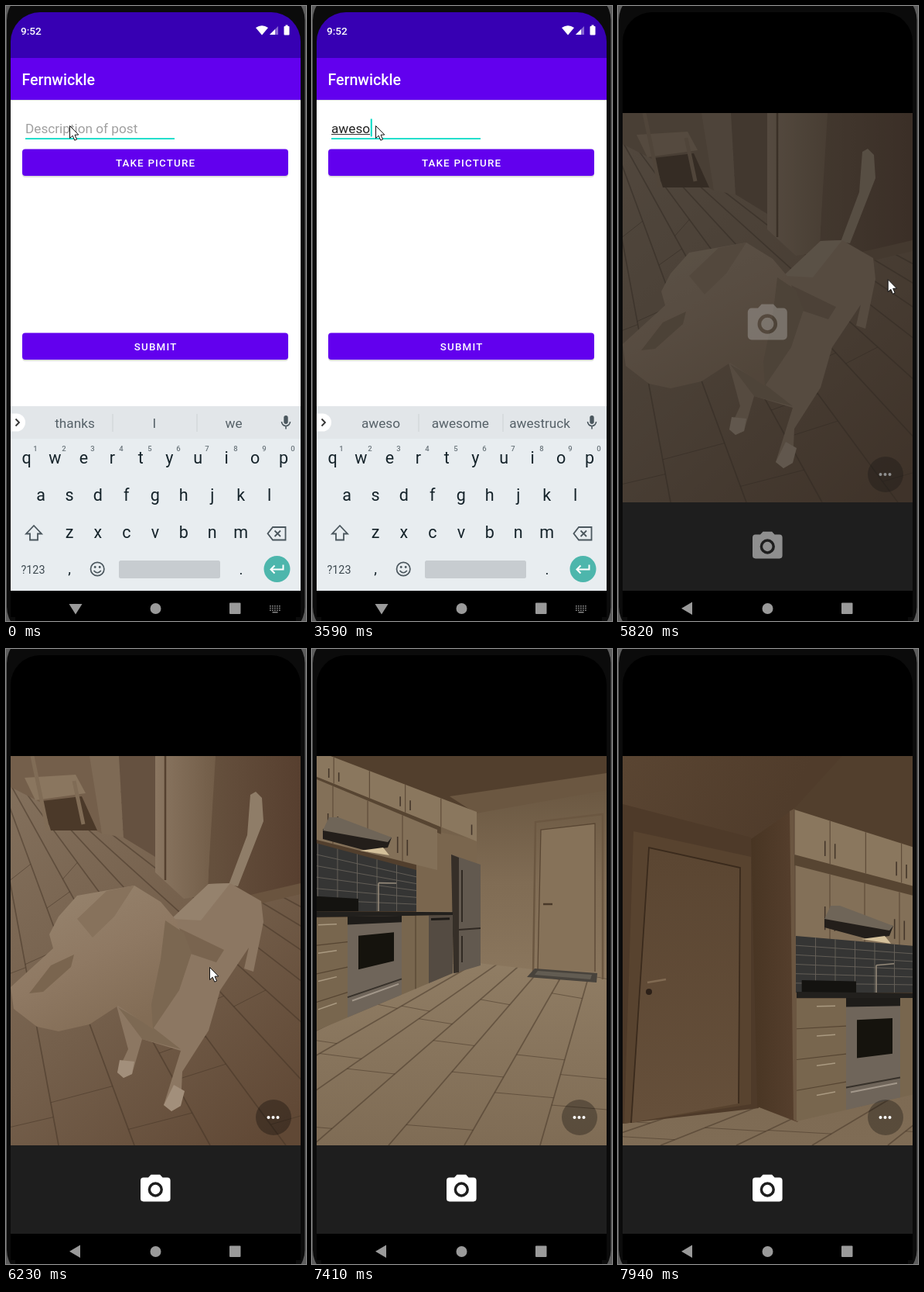
An HTML page with a canvas for the animation above (8 s loop, 388 by 793 pixels).

```html
<!DOCTYPE html>
<html lang="en">
<head>
<meta charset="utf-8">
<title>Photo post</title>
<style>
html, body { margin: 0; width: 100%; height: 100%; overflow: hidden; background: #000; }
canvas { display: block; }
</style>
</head>
<body>
<canvas id="stage" width="388" height="793"></canvas>
<script>
const c = document.getElementById('stage').getContext('2d');
const LOOP = 8000;
const PURPLE = '#6200ee', TEAL = '#03dac5', GREY = '#9a9a9a';

// ---------- helpers ----------
const mix = (a, b, k) => a + (b - a) * k;
const span = (t, a, b) => Math.max(0, Math.min(1, (t - a) / (b - a)));
const smooth = v => v * v * (3 - 2 * v);
const noise = n => Math.abs(Math.sin(n * 127.1) * 43758.5) % 1;

function rect(color, x, y, w, h, r = 0) {
  c.fillStyle = color;
  c.beginPath();
  c.roundRect(x, y, w, h, r);
  c.fill();
}
function disc(color, x, y, r) {
  c.fillStyle = color;
  c.beginPath();
  c.arc(x, y, r, 0, 7);
  c.fill();
}
function poly(color, points) {
  c.fillStyle = color;
  c.fill(new Path2D('M' + points + 'Z'));
}
function stroke(color, width, path) {
  c.strokeStyle = color;
  c.lineWidth = width;
  c.stroke(new Path2D(path));
}
function text(s, x, y, size, color, { weight = 400, align = 'center', spacing = 0 } = {}) {
  c.font = `${weight} ${size}px Roboto, sans-serif`;
  c.letterSpacing = spacing + 'px';
  c.textAlign = align;
  c.fillStyle = color;
  c.fillText(s, x, y);
  return c.measureText(s).width;
}
function gradient(x0, y0, x1, y1, ...colors) {
  const g = c.createLinearGradient(x0, y0, x1, y1);
  colors.forEach((col, i) => g.addColorStop(i / (colors.length - 1), col));
  return g;
}
function layer(draw, { x = 0, y = 0, alpha = 1, clip } = {}) {
  c.save();
  c.globalAlpha *= alpha;
  if (clip) { c.beginPath(); c.roundRect(...clip); c.clip(); }
  c.translate(x, y);
  draw();
  c.restore();
}

// ---------- post form ----------
const WORD = 'awesome';
const presses = [210, 440, 720, 870, 2070, 2220, 2340, 3590, 4090, 4210];
const deletions = [2830, 3010, 3190];
const caretOff = [[0, 210], [1390, 1850], [4710, 5220]];
// The two guesses beside the typed prefix, by its length.
const guesses = ['I we', 'I and', 'away awesome', 'awesome awful', 'awesome awestruck',
  'awesome awestruck', 'awesome awesomely', 'awesomeness awesomely'];

function button(label, y, ripple = 0) {
  rect('rgba(0,0,0,.13)', 21, y + 1, 344, 35.5, 4);
  rect(PURPLE, 21, y, 344, 34.5, 4);
  if (ripple) layer(() => disc('rgba(255,255,255,.17)', 151, y + 18, ripple), { clip: [21, y, 344, 34.5, 4] });
  text(label, 193.6, y + 22.6, 13.36, '#fff', { weight: 500, spacing: 1.19 });
}

function form(t) {
  const past = times => times.filter(at => t >= at).length;
  const length = past(presses) - past(deletions);
  const typed = WORD.slice(0, length);

  rect('#fff', 6, 121, 375, 395);
  rect('#3700b3', 6, 8, 375, 59);
  rect(PURPLE, 6, 67, 375, 54);
  rect('rgba(0,0,0,.12)', 6, 121, 375, 1);
  text('9:52', 19, 36.5, 13.6, '#fff', { weight: 500, align: 'left' });
  poly('#fff', '323,28Q331,22.5 339,28L331,37.5');
  poly('rgba(255,255,255,.4)', '341,37 352,37 352,26');
  poly('#fff', '341,37 348,37 348,30');
  rect('#fff', 359.5, 26, 7, 11.5, 1);
  rect('#fff', 361.5, 24.5, 3, 2);
  text('Fernwickle', 20.5, 102, 19.6, '#fff', { weight: 500, align: 'left' });

  if (typed) {
    const w = text(typed, 25, 164, 17.2, '#222', { align: 'left' });
    rect('#333', 25, 165, w, 1);
    if (!caretOff.some(([a, b]) => t >= a && t < b)) rect(TEAL, 25 + w + .7, 145.5, 2, 23);
  } else {
    text('Description of post', 25, 164, 17.2, '#a0a0a0', { align: 'left' });
  }
  rect(TEAL, 25, 170.2, 193, 1.9);
  button('TAKE PICTURE', 184.5, t >= 5220 ? 117 + (t - 5220) * .8 : 0);
  button('SUBMIT', 421.5);
  keyboard([typed || 'thanks', ...guesses[length].split(' ')]);
}

function hint(word, x, room) {
  c.font = '400 17.2px Roboto, sans-serif';
  const size = 17.2 * Math.min(1, room / c.measureText(word).width);
  text(word, x, 543.5, size, '#566168');
}

function keyRow(letters, x, y) {
  [...letters].forEach((ch, i) => text(ch, x + 36.95 * i, y, 21.5, '#15232a'));
}

function keyboard(hints) {
  const ink = '#4b575e';
  rect('#e8edf0', 6, 516, 375, 238);
  rect('#e2e6e9', 6, 516, 375, 42);
  hints.forEach((word, i) => hint(word, 89 + 102.8 * i, i < 2 ? 95 : 83));
  rect('#cbd1d4', 137.5, 526, 1, 23);
  rect('#cbd1d4', 246.5, 526, 1, 23);
  rect('#fff', 6, 525.5, 19, 23, [0, 11.5, 11.5, 0]);
  stroke('#333', 1.8, 'M12.5,532.5 l4.5,4.5 l-4.5,4.5');
  rect(ink, 359.3, 528, 5.4, 11, 2.7);
  stroke(ink, 1.6, 'M356.5,536 a5.5,5.5 0 0 0 11,0 M362,541.5 v4');

  keyRow('qwertyuiop', 26.5, 589.5);
  [...'1234567890'].forEach((d, i) => text(d, 38 + 37 * i, 574, 9.5, '#6b767c', { weight: 500 }));
  keyRow('asdfghjkl', 45, 637.5);
  keyRow('zxcvbnm', 82, 685.5);
  stroke(ink, 1.8, 'M36,670 L26,680.5 H31 V688.5 H41 V680.5 H46 Z');
  stroke(ink, 1.8, 'M345,672 H361.5 V688.5 H345 L338.5,680.2 Z M347.5,676.5 l7.5,7.5 m0,-7.5 l-7.5,7.5');

  text('?123', 35, 731.5, 14.3, '#3c484f');
  text(',', 82, 732, 19, '#15232a');
  text('.', 304, 733, 19, '#15232a');
  stroke(ink, 1.7, 'M109.5,726 a8.7,8.7 0 1 0 17.4,0 a8.7,8.7 0 1 0 -17.4,0 M113.5,728 q4.7,5.5 9.4,0');
  disc(ink, 115.2, 723.5, 1.4);
  disc(ink, 121.2, 723.5, 1.4);
  rect('#c7ccd0', 146, 715, 131, 23, 2.5);
  disc('#4db6ac', 350.5, 726, 17);
  stroke('#fff', 2, 'M358.5,720.5 V726.5 H343 M347.5,721.5 l-5,5 l5,5');
}

function navBar(withKeyboard) {
  rect('#000', 6, 754, 375, 34);
  poly(GREY, withKeyboard ? '81.5,771 98.5,771 90,784.5' : '96,768.5 96,785 82,776.7');
  disc(GREY, 193.5, 777, 7);
  rect(GREY, 289, 769.5, 14.5, 14.5, 1);
  if (withKeyboard) {
    for (let i = 0; i < 15; i++) rect('#888', 341 + i % 5 * 3, 773 + (i / 5 | 0) * 2.7, 1.7, 1.6);
    rect('#888', 344.5, 781, 7, 1.5);
  }
}

// ---------- camera views ----------
// Planks run from a vanishing point to the bottom edge, with scattered cross joints.
function floor(fill, vx, vy, slant) {
  rect(fill, 6, 138, 375, 502);
  const seam = 'rgba(66,50,36,.5)';
  for (let i = -14; i < 14; i++) {
    const x = vx + 98 * i;
    const at = (px, s) => `${mix(vx, px, s)},${mix(vy, 640, s)}`;
    stroke(seam, 1.7, `M${vx},${vy} L${x},640`);
    for (let j = 0; j < 3; j++) {
      const s = .3 + (j + noise(i * 3 + j)) * .24;
      stroke(seam, 1, `M${at(x, s)} L${at(x + 98, s + slant)}`);
    }
  }
}

function dogView() {
  floor(gradient(6, 200, 381, 600, '#826f5b', '#745f4b', '#604835'), -30, 110, -.04);
  // back room and chair
  poly('#745f4b', '6,138 110,138 124,238 6,178');
  poly('#4b3929', '46,196 98,190 118,234 58,234');
  poly('#8a765f', '24,166 90,162 103,186 38,195');
  stroke('#806c56', 5, 'M34,138 L54,234 M88,170 L100,226');
  poly('#7e6a55', '108,138 146,138 152,243 124,238');
  poly('#655140', '146,138 193,138 193,268 152,243');
  // door post and wall
  poly(gradient(268, 0, 381, 0, '#65503d', '#573f2f'), '268,138 381,138 381,312 260,336');
  poly('#6a543f', '260,330 381,302 381,316 260,345');
  poly(gradient(193, 0, 270, 0, '#8a7661', '#725d48'), '193,138 271,138 260,318 230,322 193,288');
  stroke('#55412f', 2.5, 'M206,138 V298');
  // dog, back to front
  poly('#8f7d68', '316,188 323,184 331,192 333,222 300,306 288,304 312,240');
  poly('#8c7762', '214,348 262,303 290,302 330,325 333,352 320,416 308,412 314,385 277,440 262,492 228,545 226,589 214,596 204,588 226,518 176,503 163,548 152,553 144,546 158,516 143,460');
  poly('#95826d', '214,348 262,303 290,302 252,350');
  poly('#79644f', '224,360 282,388 272,404 236,392');
  poly('#7d6953', '145,462 190,488 226,516 176,503');
  poly('#a28f7b', '217,562 231,570 226,589 214,596 204,588');
  poly('#a28f7b', '147,530 166,532 163,548 152,553 144,546');
  poly(gradient(60, 310, 150, 490, '#96836d', '#8f7963', '#826c55'), '6,436 61,386 56,368 68,345 92,318 166,305 200,326 222,352 212,440 190,490 145,460 108,484 68,493 40,487 10,464');
  poly('#87725c', '92,348 130,312 166,305 140,345 112,372');
  poly('#7a654f', '30,444 58,408 88,394 84,410 48,442');
  poly('#7b6751', '206,350 230,366 240,392 224,440 190,490 188,458 200,400');
}

// A wall face [x, top, bottom, x, top, bottom] blended between two viewpoints.
function face(from, to, k) {
  const [x0, t0, b0, x1, t1, b1] = from.map((v, i) => mix(v, to[i], k));
  return (u, v) => `${mix(x0, x1, u)},${mix(mix(t0, t1, u), mix(b0, b1, u), v)}`;
}
function panel(at, color, u0 = 0, v0 = 0, u1 = 1, v1 = 1) {
  poly(color, [at(u0, v0), at(u1, v0), at(u1, v1), at(u0, v1)].join(' '));
}
function bar(at, color, width, u0, v0, u1, v1) {
  stroke(color, width, `M${at(u0, v0)} L${at(u1, v1)}`);
}

function cupboards(at, color, doors) {
  panel(at, color);
  for (let i = 0; i < doors; i++) {
    const handle = (i + (i % 2 ? .14 : .86)) / doors;
    bar(at, '#5f4c39', 1.2, i / doors, 0, i / doors, 1);
    bar(at, '#44362a', 1.6, handle, .5, handle, .85);
  }
}

function cooker(at) {
  panel(at, '#6f655a', .32, 0, .67, 1);
  panel(at, '#1e1c19', .32, 0, .67, .08);
  panel(at, '#15130d', .39, .2, .62, .55);
  bar(at, '#37312a', 2, .32, .8, .67, .8);
  bar(at, '#a2978a', 2, .35, .85, .65, .85);
}

function kitchen(k) {
  const upper = face([-18, 122, 155, 213, 210, 248], [228, 207, 265, 459, 280, 326], k);
  const lower = face([-18, 158, 240, 162, 233, 285], [229, 279, 371, 409, 325, 390], k);
  const splash = face([-18, 244, 338, 135, 285, 338], [230, 370, 443, 383, 383, 443], k);
  const base = face([-18, 346, 502, 182, 343, 418], [231, 450, 609, 431, 450, 563], k);

  panel(upper, '#574532', 0, 1, .8, 1.25);
  cupboards(upper, '#8a775e', 5);
  cupboards(lower, '#837058', 4);
  panel(splash, '#353534');
  for (let row = 1; row < 6; row++) {
    bar(splash, '#68635b', .9, 0, row / 6, 1, row / 6);
    bar(splash, '#68635b', .9, row / 6, 0, row / 6, 1);
  }
  panel(splash, '#141310', .05, .78, .51, 1);
  bar(splash, '#958a7a', 1.6, .68, 1, .68, .45);
  bar(splash, '#958a7a', 1.6, .68, .45, .83, .4);
  // extractor hood
  layer(() => {
    poly('#231e1a', '14,232 103,243 98,256 70,260 14,245');
    poly('#6f6558', '22,217 34,217 103,243 98,249 14,234');
    poly('#d4c09a', '62,260 92,256 100,266');
  }, { x: 253 * k, y: 114 * k });

  panel(base, '#78664e');
  for (let i = 0; i < 4; i++) {
    bar(base, '#564532', 1.2, 0, i / 4, .32, i / 4);
    bar(base, '#aa9a81', 1.5, .13, i / 4 + .07, .25, i / 4 + .07);
  }
  cooker(base);
  bar(base, '#564532', 1.2, .76, 0, .76, 1);
  panel(base, '#544b42', .845, 0, 1, 1);
  bar(base, '#1d1a17', 3, .86, .06, .98, .06);
  panel(base, '#22201d', 0, -.05, 1, 0);
}

function farWall() {
  poly(gradient(0, 180, 0, 420, '#6b5842', '#806c54', '#8a765d'), '135,230 205,210 381,180 700,126 700,470 381,424 215,405 135,405');
  poly('#6b5741', '178,190 381,160 381,182 212,212');
  poly('#7a664e', '135,230 213,246 213,338 135,338');
  poly('#62594f', '180,265 218,278 218,408 184,418');
  poly('#362f28', '180,265 190,269 190,417 183,418');
  stroke('#302923', 2, 'M190,362 L218,360 M194,285 V352 M194,370 V404');
  stroke('#6b5741', 2.5, 'M286,420 L289,223 L376,213 V426');
  poly('#867259', '296,233 366,225 366,416 292,413');
  stroke('#594633', 1.3, 'M292,413 L296,233 L366,225 V416');
  stroke('#493929', 2.4, 'M299,329 h12');
  poly('#48433c', '288,412 369,418 368,430 278,423');
  poly('#625c52', '292,415 362,420 360,426 288,420');
}

function nearDoor() {
  poly(gradient(6, 138, 200, 240, '#5a4532', '#503c2b'), '6,138 290,138 228,206 172,245 6,205');
  poly('#4e3a29', '6,200 172,243 182,592 6,612');
  poly('#58432f', '20,235 172,268 172,587 8,612');
  poly(gradient(0, 260, 0, 600, '#5b4632', '#654f3a'), '40,256 158,282 156,586 17,611');
  stroke('#3a2a1c', 1.8, 'M17,611 L40,256 L158,282 L156,586');
  stroke('#806a52', 2.4, 'M38,430 L62,426');
  disc('#2c2018', 40, 442, 4);
  poly(gradient(172, 0, 230, 0, '#483523', '#563f2d'), '172,245 228,206 232,610 180,590');
  poly('#6b5641', '222,209 228,206 233,610 227,607');
}

function room(k) {
  const x = 250 * k, y = 107 * k;
  floor(gradient(0, 400 + y, 0, 640, k > .5 ? '#7c6952' : '#907d64', '#7f6c55'), 393 + x, 300 + y, .02);
  rect('#523f2d', 6, 138, 375, 250 + y);
  layer(farWall, { x, y });
  layer(nearDoor, { x: x - 250, y: y - 107 });
  kitchen(k);
}

function preview(t) {
  const turn = span(t, 6600, 7410), x = 375 * mix(turn, smooth(turn), .4);
  if (turn < 1) layer(dogView, { x });
  if (turn > 0) layer(() => room(span(t, 7470, 7940)), { x: x - 375 });
}

function cameraIcon(color, x, y, scale) {
  const body = new Path2D('M9,2 L7.2,4 H4 a2,2 0 0 0 -2,2 V18 a2,2 0 0 0 2,2 H20 a2,2 0 0 0 2,-2 V6 a2,2 0 0 0 -2,-2 H16.8 L15,2 Z M17,12 a5,5 0 1 1 -10,0 a5,5 0 1 1 10,0 Z M15.2,12 a3.2,3.2 0 1 0 -6.4,0 a3.2,3.2 0 1 0 6.4,0 Z');
  layer(() => {
    c.scale(scale, scale);
    c.fillStyle = color;
    c.fill(body, 'evenodd');
  }, { x: x - 12 * scale, y: y - 12 * scale });
}

function cameraApp(t) {
  const ready = span(t, 5620, 6020);
  rect('#000', 6, 8, 375, 130);
  rect('#1e1e1e', 6, 640, 375, 114);
  layer(() => {
    preview(t);
    disc('rgba(0,0,0,.3)', 346, 604, 23);
    [-6, 0, 6].forEach(dx => disc('#fff', 345.5 + dx, 604, 2));
    layer(() => {
      rect('#1e1e1e', 6, 138, 375, 502);
      cameraIcon('#a39f9a', 193.3, 410, 2.55);
    }, { alpha: 1 - ready });
  }, { clip: [6, 138, 375, 502] });
  layer(() => cameraIcon('#fff', 193.3, 697, 1.93), { alpha: ready });
  navBar(false);
}

// ---------- pointer ----------
const pointerPath = [
  [0, 82, 154], [4960, 82, 154], [5040, 143, 193], [5280, 143, 193],
  [5820, 349, 352], [6050, 276, 376], [6230, 263, 410], [LOOP, 263, 410]
];

function pointer(t) {
  const i = pointerPath.findLastIndex(key => t >= key[0]);
  const [t0, x0, y0] = pointerPath[i], [t1, x1, y1] = pointerPath[i + 1];
  const k = span(t, t0, t1);
  layer(() => {
    const arrow = '0,0 0,16 3.7,12.7 6.3,18.7 9,17.5 6.5,11.7 11.3,11.5';
    poly('#fff', arrow);
    stroke('#111', 1, 'M' + arrow + 'Z');
  }, { x: mix(x0, x1, k) + .5, y: mix(y0, y1, k) + .5 });
}

// ---------- stage ----------
function draw(t) {
  rect('#5c5c5c', 0, 0, 388, 793);
  rect('#0b0b0b', 1, -18, 385.5, 829, 36);
  layer(() => {
    const opening = span(t, 5400, 5520);
    if (opening < 1) {
      form(t);
      navBar(true);
    }
    if (opening) layer(() => cameraApp(t), { alpha: opening });
  }, { clip: [6, 8, 375, 785, [38, 38, 0, 0]] });
  rect('#000', 12, 785, 363, 8);
  if (t < 6600) pointer(t);
}

function tick() {
  draw(performance.now() % LOOP);
  requestAnimationFrame(tick);
}
tick();
</script>
</body>
</html>
```
